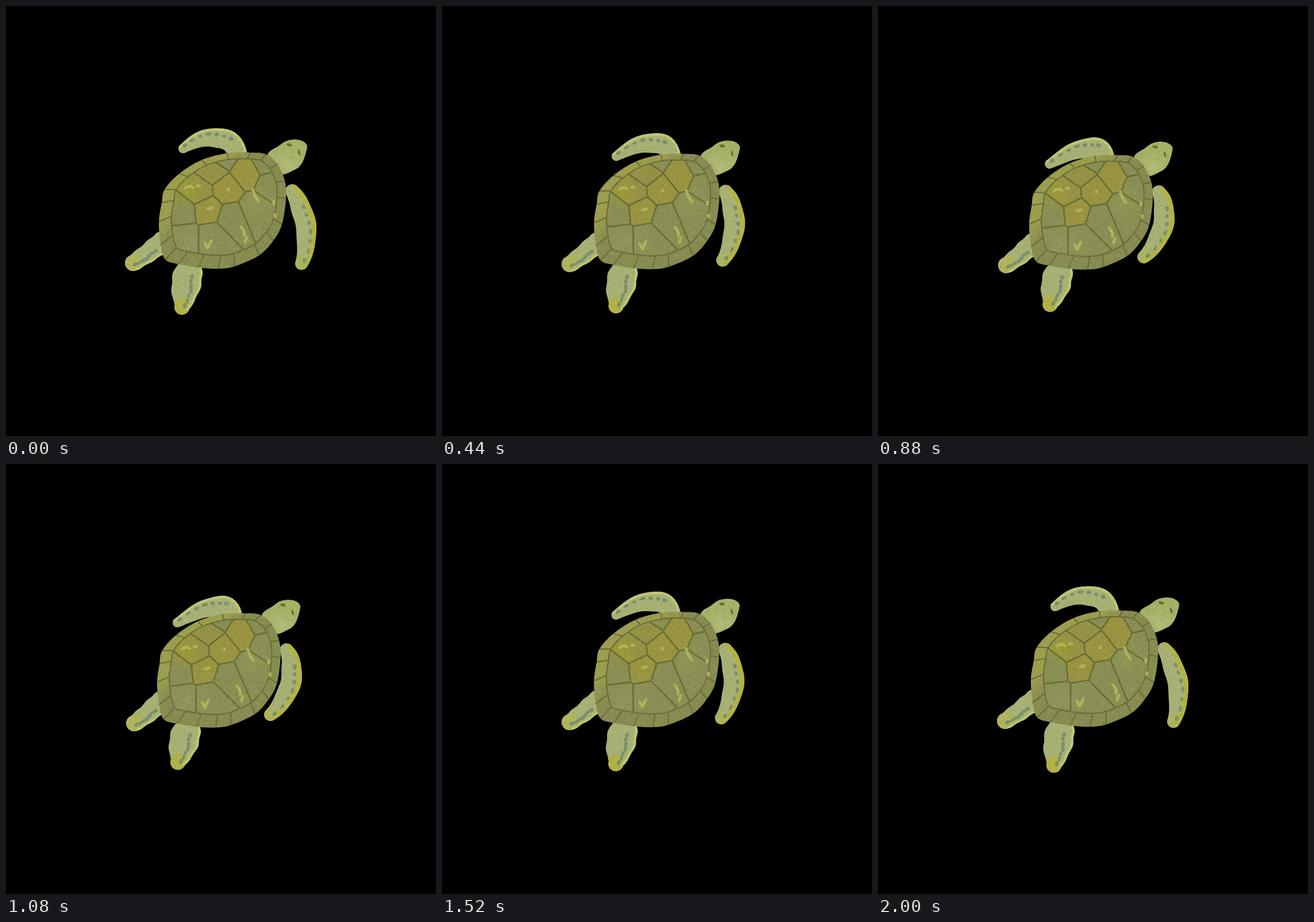
Animation, 748 px wide and 748 px high, one loop 2040 ms. Source, as an HTML page with a canvas:

```html
<!DOCTYPE html>
<html>
<head>
<meta charset="utf-8">
<style>
html, body { margin: 0; width: 100%; height: 100%; overflow: hidden; background: #000; }
canvas { display: block; width: 748px; height: 748px; }
</style>
</head>
<body>
<canvas id="c" width="748" height="748"></canvas>
<script>
const ctx = document.getElementById('c').getContext('2d');
const LOOP = 2040, STEP = 40, HALF = 1000;
const SEAM = '#676c34', SPOT = '#788f6b', SKIN = '#a8b175', LIT = '#bec876', YELLOW = '#b3b345';
const OLIVE = '#888d53', OCHRE = '#949145', GOLD = '#99933f';

// Limbs are tapered tubes around a cubic spine (root to tip) that bends from open to fold.
const limbs = [
  { open: [404,262, 400,222, 345,219, 308,248], fold: [395,266, 392,234, 345,246, 298,276],
    root: 16, bulge: 5, tip: 8, lit: -1, tint: LIT, band: 9, tipTint: SKIN },
  { open: [498,322, 516,350, 534,395, 514,448], fold: [488,324, 504,352, 502,398, 460,436],
    root: 12, bulge: 6.5, tip: 11, lit: 1, tint: YELLOW, band: 17, tipTint: '#adb45f' },
  { open: [272,411, 257,422, 236,438, 221,447], fold: [270,414, 256,425, 238,442, 223,451],
    root: 19, bulge: 0, tip: 14, lit: 1, tint: LIT, band: 7, tipTint: '#b0b55c' },
  { open: [322,450, 314,470, 312,496, 306,524], fold: [319,451, 311,472, 307,495, 299,519],
    root: 20, bulge: 9, tip: 13, lit: 1, tint: LIT, band: 9, tipTint: YELLOW }
];

const shell = [425,255, 452,258, 472,275, 485,304, 487,335, 480,380, 465,408, 440,434, 397,453, 369,457,
  335,455, 300,449, 277,441, 269,415, 266,375, 271,342, 276,319, 301,292, 340,268, 385,256];
const head = [455,260, 475,243, 490,234, 510,233, 523,241, 522,254, 515,273, 502,285, 474,292];

// Scutes are the Voronoi cells of these seeds.
const scutes = [
  [452,272,OLIVE], [418,291,GOLD], [384,318,GOLD], [350,354,GOLD], [375,262,OLIVE], [360,286,OCHRE], [335,322,OCHRE],
  [307,358,OLIVE], [460,310,OLIVE], [432,352,OLIVE], [393,368,OLIVE], [358,402,OLIVE], [312,402,OLIVE]
];
const streaks = new Path2D('M311 317Q319 311 325 316M333 313h4M429 319Q432 332 439 339M357 409l-6 12l-5 -8M409 384Q416 393 414 399M419 402l-3 8M352 353l7 -2M387 318v2M466 340v4M468 363v3');

let seed;
const random = () => (seed = seed * 16807 % 2147483647) / 2147483647;
const mix = (a, b, t) => a + (b - a) * t;

function makeGrain() {
  const tile = document.createElement('canvas');
  tile.width = tile.height = 256;
  const g = tile.getContext('2d');
  seed = 7;
  for (let i = 0; i < 26000; i++) {
    g.fillStyle = random() < .55 ? `rgba(210,215,142,${random() * .32})` : `rgba(70,76,32,${random() * .25})`;
    g.fillRect(random() * 256 | 0, random() * 256 | 0, 1, 1);
  }
  return ctx.createPattern(tile, 'repeat');
}
const grain = makeGrain();

// Closed Catmull-Rom curve.
function smooth(p) {
  const n = p.length / 2, path = new Path2D();
  const at = (i, axis) => p[(i + n) % n * 2 + axis];
  const ctrl = (i, axis, s) => at(i, axis) + s * (at(i + 1, axis) - at(i - 1, axis)) / 6;
  path.moveTo(p[0], p[1]);
  for (let i = 0; i < n; i++) {
    path.bezierCurveTo(ctrl(i, 0, 1), ctrl(i, 1, 1), ctrl(i + 1, 0, -1), ctrl(i + 1, 1, -1), at(i + 1, 0), at(i + 1, 1));
  }
  return path;
}

function polygon(points, closed = true) {
  const path = new Path2D();
  for (const [x, y] of points) path.lineTo(x, y);
  if (closed) path.closePath();
  return path;
}

// Cuts a box along the bisector to every other seed.
function voronoi([x, y]) {
  let poly = [[200,200], [550,200], [550,550], [200,550]];
  for (const [sx, sy] of scutes) {
    if (sx === x && sy === y) continue;
    const side = p => (p[0] - (x + sx) / 2) * (sx - x) + (p[1] - (y + sy) / 2) * (sy - y);
    poly = poly.flatMap((p, k) => {
      const q = poly[(k + 1) % poly.length], a = side(p), b = side(q), out = a <= 0 ? [p] : [];
      if (a * b < 0) out.push([mix(p[0], q[0], a / (a - b)), mix(p[1], q[1], a / (a - b))]);
      return out;
    });
  }
  return polygon(poly);
}

const inner = shell.map((v, i) => mix(i % 2 ? 320 : 395, v, .83));
const shellPath = smooth(shell), innerPath = smooth(inner), headPath = smooth(head);
const cells = scutes.map(s => ({ path: voronoi(s), color: s[2] }));
const spokes = new Path2D();
for (let i = 0; i < shell.length; i += 2) {
  spokes.moveTo(shell[i], shell[i + 1]);
  spokes.lineTo(inner[i], inner[i + 1]);
}
const rim = ctx.createLinearGradient(280, 300, 400, 420);
rim.addColorStop(.27, '#9c9d4d');
rim.addColorStop(.46, '#868a50');

function fill(path, color) { ctx.fillStyle = color; ctx.fill(path); }

function stroke(path, color, width) {
  ctx.strokeStyle = color;
  ctx.lineWidth = width;
  ctx.stroke(path);
}

function oval(x, y, rx, ry, turn, color) {
  ctx.fillStyle = color;
  ctx.beginPath();
  ctx.ellipse(x, y, rx, ry, turn, 0, 7);
  ctx.fill();
}

function glow(x, y, r, rgb, alpha) {
  const g = ctx.createRadialGradient(x, y, 0, x, y, r);
  g.addColorStop(0, `rgba(${rgb},${alpha})`);
  g.addColorStop(1, `rgba(${rgb},0)`);
  oval(x, y, r, r, 0, g);
}

// Paints inside a shape, then dusts it with grain.
function layer(path, color, paint, dx = 0, dy = 0) {
  ctx.save();
  fill(path, color);
  ctx.clip(path);
  paint();
  ctx.translate(dx, dy);
  ctx.fillStyle = grain;
  ctx.fillRect(0, 0, 748, 748);
  ctx.restore();
}

function drawLimb(limb, q) {
  const { open, fold, root, bulge, tip, lit, tint, band, tipTint } = limb;
  const p = open.map((v, i) => mix(v, fold[i], q));
  const spine = t => {
    const u = 1 - t;
    const pos = k => u * u * u * p[k] + 3 * u * u * t * p[k + 2] + 3 * u * t * t * p[k + 4] + t * t * t * p[k + 6];
    const vel = k => u * u * (p[k + 2] - p[k]) + 2 * u * t * (p[k + 4] - p[k + 2]) + t * t * (p[k + 6] - p[k + 4]);
    return { x: pos(0), y: pos(1), turn: Math.atan2(vel(1), vel(0)), w: mix(root, tip, t) + bulge * 4 * t * u };
  };
  const edge = (t, side, reach = 1) => {
    const { x, y, turn, w } = spine(t);
    const r = w * reach * (1 + .04 * side * Math.sin(t * 15));
    return [x + Math.sin(turn) * r * side, y - Math.cos(turn) * r * side];
  };
  const steps = [...Array(21).keys()].map(i => i / 20);
  const cap = (t, from) => steps.map(s => {
    const { x, y, turn, w } = spine(t), a = turn + from + s * Math.PI;
    return [x + Math.cos(a) * w, y + Math.sin(a) * w];
  });
  const body = polygon([...steps.map(t => edge(t, 1)), ...cap(1, -Math.PI / 2),
    ...steps.map(t => edge(1 - t, -1)), ...cap(0, Math.PI / 2)]);
  layer(body, SKIN, () => {
    const end = spine(1);
    oval(end.x, end.y, tip * 1.15, tip * 1.15, 0, tipTint);
    stroke(polygon(steps.map(t => edge(t, lit)), false), tint, band);
    seed = 1234;
    for (let t = .3; t < 1; t += .11) {
      const [x, y] = edge(t, random() < .5 ? lit : -lit, .2 + .35 * random());
      oval(x, y, 3.5 + 2 * random(), 2.2 + random(), spine(t).turn, SPOT);
    }
  }, p[0] - open[0], p[1] - open[1]);
}

function drawHead() {
  layer(headPath, '#a6b166', () => {
    glow(490, 278, 28, '184,192,132', .7);
    oval(493, 241.5, 5, 2.6, .1, SEAM);
    oval(510, 255, 1.8, 5, -.25, SEAM);
  });
}

function drawShell() {
  layer(shellPath, rim, () => {
    stroke(spokes, SEAM, 2.2);
    ctx.save();
    ctx.clip(innerPath);
    for (const { path, color } of cells) fill(path, color);
    glow(315, 322, 32, '160,157,45', .7);
    glow(325, 408, 50, '152,155,104', .45);
    glow(436, 340, 34, '150,156,86', .5);
    for (const { path } of cells) stroke(path, SEAM, 2.4);
    ctx.restore();
    stroke(innerPath, SEAM, 2.2);
    stroke(streaks, '#b0b35c', 5);
  });
}

function draw(now) {
  const t = Math.floor(now % LOOP / STEP) * STEP;
  const q = Math.max(0, 1 - Math.abs(1 - t / HALF)) / .92;
  ctx.setTransform(1, 0, 0, 1, 0, 0);
  ctx.clearRect(0, 0, 748, 748);
  ctx.lineCap = ctx.lineJoin = 'round';
  for (const limb of limbs) drawLimb(limb, q);
  // The body shrinks and turns a little as the flippers fold.
  ctx.setTransform(1 - .026 * q, -.015 * q, .015 * q, 1 - .02 * q, -1.9 * q, 16.1 * q);
  drawHead();
  drawShell();
}

const start = performance.now();
function tick() {
  draw(performance.now() - start);
  requestAnimationFrame(tick);
}
tick();
</script>
</body>
</html>
```
